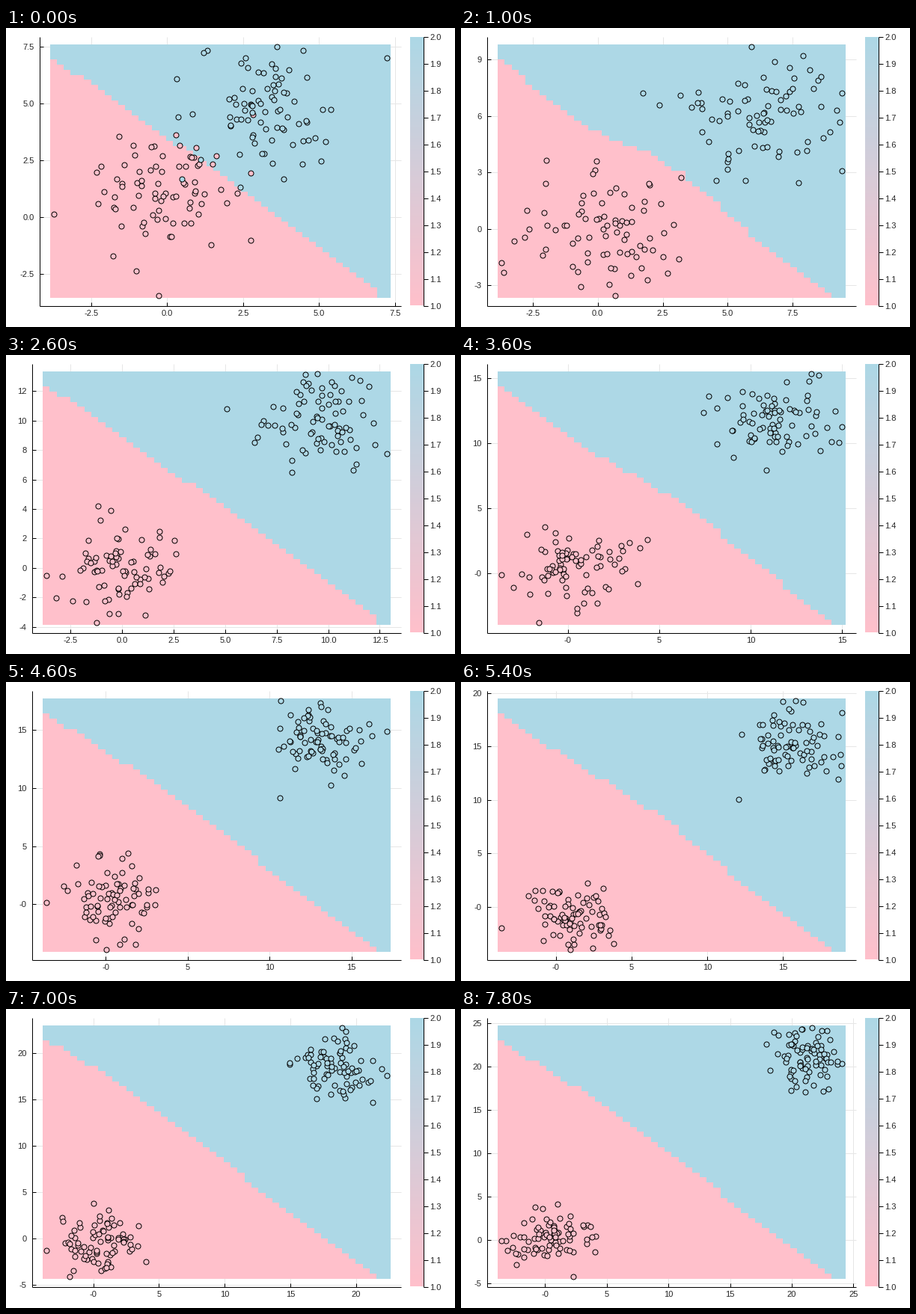
Recreate the animation shown at these times as a matplotlib script. Size 600 px wide and 400 px high, loop 8 s.

```python
import numpy as np
import matplotlib.pyplot as plt
from matplotlib.animation import FuncAnimation
from matplotlib.collections import LineCollection
from matplotlib.colors import LinearSegmentedColormap

W, H, DPI = 600, 400, 100
FRAMES, STEP_MS = 40, 200
CELLS, COUNT, SPREAD = 50, 80, 1.5
PX = 72 / DPI
PINK, BLUE = "#ffc0cb", "#add8e6"
CMAP = LinearSegmentedColormap.from_list("classes", [PINK, BLUE])
RIGHT, TOP, BOTTOM = 514, 22, 361          # heatmap edges on the stage
AX_RIGHT, AX_TOP, AX_BOTTOM = 528, 12, 372
BAR_LEFT, BAR_RIGHT = 540, 558


def x_step(width):
    return 2.5 if width < 19.2 else 5


def y_step(width):
    if width < 13:
        return 2.5
    if width < 16:
        return 3
    return 2 if width < 19.2 else 5


def ticks(lo, hi, pick_step):
    pad = 0.03 * (hi - lo)
    lo, hi = lo - pad, hi + pad
    step = pick_step(hi - lo)
    values = np.arange(np.ceil(lo / step), np.floor(hi / step) + 1) * step
    decimals = 1 if step == 2.5 else 0
    return values, [f"{v:.{decimals}f}" for v in values], decimals


def limits(mean):
    """Heatmap range, widening as the second cluster moves away."""
    return (-3.85, 3.0 + 1.09 * mean), (-3.3 - 0.06 * mean, 3.2 + 1.1 * mean)


def clusters(rng, mean, ranges):
    """Two normal clouds whose outermost points sit in the outermost cells."""
    pts = rng.normal(0, SPREAD, (2, COUNT, 2))
    pts[1] += mean
    for axis, (lo, hi) in enumerate(ranges):
        half = (hi - lo) / CELLS / 2
        v = pts[..., axis]
        pts[..., axis] = np.interp(v, (v.min(), v.max()), (lo + half, hi - half))
    return pts


def boundary(rng, u):
    """Stage height of the class border at fraction u of the width."""
    y = 40 + 330 * u - 9 * np.sin(np.pi * u)
    for n in (2, 3, 5):
        y += rng.normal(0, 10 / n) * np.sin(np.pi * n * u)
    return y


def lines(segments, color="black", z=4):
    ax.add_collection(LineCollection(segments, colors=color, linewidths=PX, zorder=z))


def label(x, y, text, ha):
    ax.text(x, y, text, ha=ha, va="center_baseline", fontsize=8,
            family="Liberation Sans", color="#262626")


def draw_colorbar():
    ax.imshow(np.linspace(1, 0, 256)[:, None], cmap=CMAP, aspect="auto",
              extent=(BAR_LEFT, BAR_RIGHT, 371, AX_TOP), zorder=2)
    ys = np.linspace(AX_BOTTOM, AX_TOP, 11)
    lines([[(BAR_RIGHT, AX_TOP), (BAR_RIGHT, AX_BOTTOM)]]
          + [[(BAR_RIGHT, y), (BAR_RIGHT + 6, y)] for y in ys])
    for i, y in enumerate(ys):
        label(BAR_RIGHT + 8.5, y, f"{1 + i / 10:.1f}", "left")


def draw(step):
    ax.clear()
    ax.axis("off")
    rng = np.random.default_rng(700 + step)
    mean = 4 + 0.4 * step
    xr, yr = limits(mean)
    pts = clusters(rng, mean, (xr, yr))
    xt, x_names, _ = ticks(*xr, x_step)
    yt, y_names, decimals = ticks(*yr, y_step)

    left = 49 + 10 * decimals              # wider labels push the plot right
    ax_left = left - 14

    def sx(v):
        return left + (v - xr[0]) / (xr[1] - xr[0]) * (RIGHT - left)

    def sy(v):
        return BOTTOM + (v - yr[0]) / (yr[1] - yr[0]) * (TOP - BOTTOM)

    xp, yp = sx(xt), sy(yt)
    lines([[(x, AX_TOP), (x, AX_BOTTOM)] for x in xp]
          + [[(ax_left, y), (AX_RIGHT, y)] for y in yp], "#e6e6e6", 1)

    mid = (np.arange(CELLS) + 0.5) / CELLS
    rows = TOP + mid * (BOTTOM - TOP)
    ax.imshow(rows[:, None] < boundary(rng, mid), cmap=CMAP, vmin=0, vmax=1,
              aspect="auto", interpolation="nearest",
              extent=(left, RIGHT, BOTTOM, TOP), zorder=2)

    for group, color in zip(pts, (PINK, BLUE)):
        ax.plot(sx(group[:, 0]), sy(group[:, 1]), "o", ms=7 * PX, mfc=color,
                mec="black", mew=PX, zorder=3)

    lines([[(ax_left, AX_TOP), (ax_left, AX_BOTTOM)],
           [(ax_left, AX_BOTTOM), (AX_RIGHT, AX_BOTTOM)]]
          + [[(x, AX_BOTTOM), (x, AX_BOTTOM - 5)] for x in xp]
          + [[(ax_left, y), (ax_left + 5, y)] for y in yp])
    for x, name in zip(xp, x_names):
        label(x, 381, name, "center")
    for y, name in zip(yp, y_names):
        label(ax_left - 7.5, y, name, "right")

    draw_colorbar()
    ax.set_xlim(0, W)
    ax.set_ylim(H, 0)
    return []


fig = plt.figure(figsize=(W / DPI, H / DPI), dpi=DPI, facecolor="white")
ax = fig.add_axes((0, 0, 1, 1))
anim = FuncAnimation(fig, draw, frames=FRAMES, interval=STEP_MS,
                     init_func=lambda: draw(0), repeat=True, repeat_delay=0)
plt.show()
```
